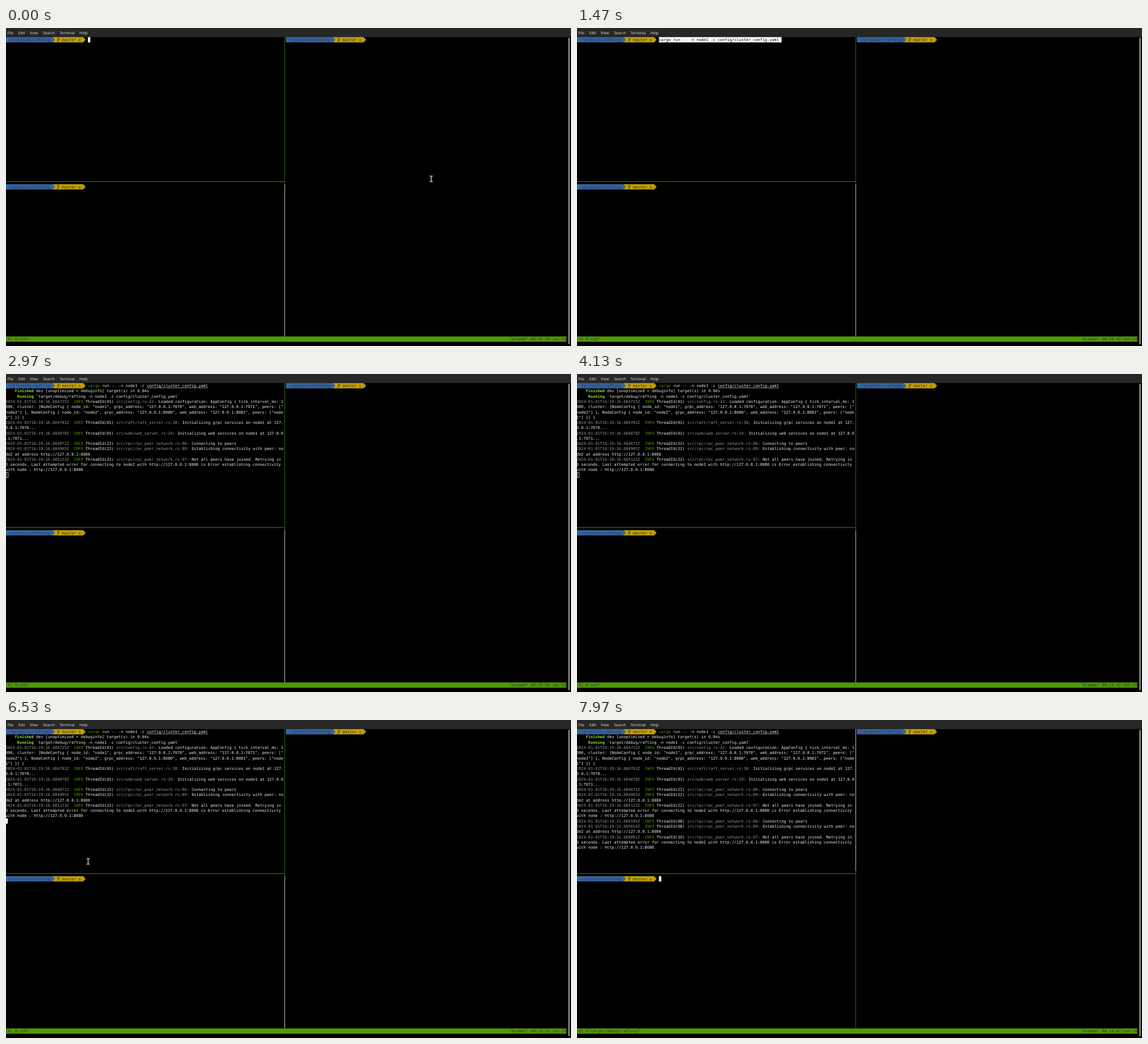
Write an HTML page that moves like this. It is 998 by 561 pixels and loops after 8 s.

```html
<!DOCTYPE html>
<html lang="en">
<head>
<meta charset="utf-8">
<title>Terminal session</title>
<style>
  html, body { margin: 0; width: 100%; height: 100%; overflow: hidden; background: #000; }
  svg { display: block; width: 998px; height: 561px; }
  text {
    font: 6.915px "DejaVu Sans Mono", "Liberation Mono", monospace;
    fill: #eeeeec; white-space: pre; text-rendering: geometricPrecision;
  }
  .menu { font: 6.6px "Noto Sans", "Open Sans", sans-serif; fill: #dedede; }
  .dim { fill: #989a95; }
  .green { fill: #4e9a06; }
  .bright { fill: #8ae234; font-weight: bold; }
  .dark { fill: #2e3436; }
  .black { fill: #000; }
</style>
</head>
<body>
<svg id="stage" viewBox="0 0 998 561"></svg>
<script>
const LOOP = 8000, COLS = 118;
const CELL = 4.163, ROW = 9.265, LEFT = -1, TOP = 16.1;
const PASTE = 1400, RUN = 2030, BLUR = 2900, FOCUS = 6300, RETRY = 7040, SWITCH = 7450;
const BLUE = '#3465a4', YELLOW = '#c4a000', GREEN = '#4e9a06';

const stage = document.getElementById('stage');
const X = col => LEFT + col * CELL;
const Y = row => TOP + row * ROW;

function add(parent, tag, attrs = {}, content) {
  const node = document.createElementNS('http://www.w3.org/2000/svg', tag);
  for (const key in attrs) node.setAttribute(key, attrs[key]);
  if (content) node.textContent = content;
  return parent.appendChild(node);
}
const group = () => add(stage, 'g');
const show = (node, on) => node.setAttribute('visibility', on ? 'visible' : 'hidden');
const rect = (parent, x, y, width, height, fill) =>
  add(parent, 'rect', { x, y, width, height, fill });
const write = (parent, col, row, str, cls = '') =>
  add(parent, 'text', { x: X(col), y: Y(row) + 7.1, class: cls }, str);

function prompt(col, row) {
  const arrow = (c, fill) => add(stage, 'path', {
    d: `M${X(c) - .2} ${Y(row)}h.2l${CELL} ${ROW / 2}l${-CELL} ${ROW / 2}h-.2z`, fill });
  rect(stage, X(col + 20), Y(row), 13 * CELL, ROW, YELLOW);
  rect(stage, X(col), Y(row), 20 * CELL, ROW, BLUE);
  arrow(col + 20, BLUE);
  arrow(col + 33, YELLOW);
  write(stage, col + 1, row, '~/projects/rafting', 'dark');
  write(stage, col + 24, row, 'master ±', 'dark');
  // branch symbol
  add(stage, 'path', {
    d: `M${X(col + 22) + 1} ${Y(row) + 1}v7.5m0-1.5l2-2.2v-2.6m-1 1l1-1.2l1 1.2`,
    fill: 'none', stroke: '#2e3436', 'stroke-width': .8 });
}

// Writes coloured segments, wrapping at the pane edge; returns the next free row.
function wrapped(parent, row, segments) {
  let col = 0;
  for (let [cls, str] of segments) {
    while (str) {
      if (col === COLS) { col = 0; row++; }
      const part = str.slice(0, COLS - col);
      write(parent, col, row, part, cls);
      col += part.length;
      str = str.slice(part.length);
    }
  }
  return row + 1;
}

const log = (parent, row, time, thread, file, message) => wrapped(parent, row, [
  ['dim', `2024-01-01T16:19:${time}Z  `], ['green', 'INFO '],
  ['', `ThreadId(${thread}) `], ['dim', `src/${file}: `], ['', message]
]);

function connectionLogs(parent, row, times, threads) {
  const file = 'rpc/rpc_peer_network.rs:';
  const url = 'http://127.0.0.1:8080';
  const messages = [
    [86, 'Connecting to peers'],
    [89, `Establishing connectivity with peer: node2 at address ${url}`],
    [97, 'Not all peers have joined. Retrying in 3 seconds. Last attempted error for connecting ' +
      `to node2 with ${url} is Error establishing connectivity with node : ${url}`]
  ];
  messages.forEach(([line, message], i) => {
    row = log(parent, row, times[i], threads[i], file + line, message);
  });
  return row;
}

// Window frame
rect(stage, 0, 0, 998, 561, '#000');
rect(stage, 0, 0, 998, 16, '#272727');
[['File', 2.5], ['Edit', 21.8], ['View', 42], ['Search', 65.5], ['Terminal', 94.5], ['Help', 129.8]]
  .forEach(([label, x]) => add(stage, 'text', { x, y: 10.9, class: 'menu' }, label));
add(stage, 'rect', { x: 993, y: 17, width: 3, height: 541, rx: 1.5, fill: '#7c7c7c' });

// Pane borders
const borderX = X(118.5) - .5;
rect(stage, 0, Y(27.5) - .5, borderX, 1, '#4a8a05');
const upperBorder = rect(stage, borderX, Y(0), 1, 27 * ROW);
rect(stage, borderX, Y(27), 1, ROW, '#2f6b2a');
const lowerBorder = rect(stage, borderX, Y(28), 1, 29 * ROW);

// Status line
rect(stage, 0, Y(57), X(238), ROW, GREEN);
const status = write(stage, 0, 57, '', 'dark');
write(stage, 214, 57, '"bramok" 00:19 02-Jan-24', 'dark');

prompt(0, 0);
prompt(119, 0);
prompt(0, 28);

// Pasted command
const command = 'cargo run -- -n node1 -c config/cluster_config.yaml';
const pasted = group();
rect(pasted, X(35), Y(0), 52 * CELL, ROW, '#fff');
write(pasted, 35, 0, command, 'black');

// Program output
const output = group();
write(output, 35, 0, 'cargo', 'green');
write(output, 41, 0, command.slice(6));
rect(output, X(60), Y(0) + 8, 26 * CELL, .6, '#eeeeec');
write(output, 4, 1, 'Finished', 'bright');
write(output, 13, 1, 'dev [unoptimized + debuginfo] target(s) in 0.04s');
write(output, 5, 2, 'Running', 'bright');
write(output, 13, 2, '`target/debug/rafting -n node1 -c config/cluster_config.yaml`');

const nodeConfig = (id, port, peer) =>
  `NodeConfig { node_id: "node${id}", grpc_address: "127.0.0.1:${port}", ` +
  `web_address: "127.0.0.1:${port + 1}", peers: ["node${peer}"] }`;
let next = log(output, 3, '16.684725', '01', 'config.rs:42',
  'Loaded configuration: AppConfig { tick_interval_ms: 1000, cluster: ' +
  `[${nodeConfig(1, 7070, 2)}, ${nodeConfig(2, 8080, 1)}] }`);
next = log(output, next, '16.684781', '01', 'raft/raft_server.rs:30',
  'Initializing grpc services on node1 at 127.0.0.1:7070...');
next = log(output, next, '16.684878', '01', 'web/web_server.rs:24',
  'Initializing web services on node1 at 127.0.0.1:7071...');
const waitRow = connectionLogs(output, next,
  ['16.684871', '16.684905', '16.685123'], ['22', '22', '22']);

const retry = group();
const retryRow = connectionLogs(retry, waitRow,
  ['21.685595', '21.685655', '21.686001'], ['08', '08', '10']);

const cursor = add(stage, 'rect', { 'stroke-width': .7 });

const pointer = group();
const beam = 'M-2.6-4.8h1.8l.8.7l.8-.7h1.8M0-4.1v8.2M-2.6 4.8h1.8l.8-.7l.8.7h1.8';
add(pointer, 'path', { d: beam, fill: 'none', stroke: '#e4e4e4', 'stroke-width': 1.8 });
add(pointer, 'path', { d: beam, fill: 'none', stroke: '#111', 'stroke-width': .5 });

function placeCursor(t) {
  let col = 0, row = waitRow;
  if (t < PASTE) [col, row] = [35, 0];
  else if (t < RUN) [col, row] = [86, 0];
  else if (t >= SWITCH) [col, row] = [35, 28];
  else if (t >= RETRY) row = retryRow;

  const hollow = (t >= 1030 && t < PASTE) || (t >= BLUR && t < FOCUS);
  const inset = hollow ? .35 : 0;
  const x = Math.max(0, X(col));
  const attrs = {
    x: x + inset, y: Y(row) + inset,
    width: X(col + 1) - x + inset, height: ROW - 2 * inset,
    fill: hollow ? 'none' : '#fff', stroke: hollow ? '#eee' : 'none'
  };
  for (const key in attrs) cursor.setAttribute(key, attrs[key]);
}

function placePointer(t) {
  show(pointer, t < PASTE || (t >= 5370 && t < SWITCH));
  let x = 751, y = 266.3;
  if (t >= PASTE) {
    const u = Math.min(1, Math.max(0, (t - 5620) / 830));
    const p = u * u * (3 - 2 * u);
    x = 781.8 - 636.6 * p;
    y = 252.8 - 3.2 * p + 12 * Math.sin(Math.PI * p);
  }
  pointer.setAttribute('transform', `translate(${x} ${y})`);
}

function render(t) {
  show(pasted, t >= PASTE && t < RUN);
  show(output, t >= RUN);
  show(retry, t >= RETRY);
  status.textContent = t < RETRY ? '[0] 0:zsh*' : '[0] 0:target/debug/rafting*';
  const lowerActive = t >= SWITCH;
  upperBorder.setAttribute('fill', lowerActive ? '#c8c8c8' : '#2f6b2a');
  lowerBorder.setAttribute('fill', lowerActive ? '#2f6b2a' : '#c8c8c8');
  placeCursor(t);
  placePointer(t);
}

const start = performance.now();
function tick() {
  render((performance.now() - start) % LOOP);
  requestAnimationFrame(tick);
}
tick();
</script>
</body>
</html>
```
